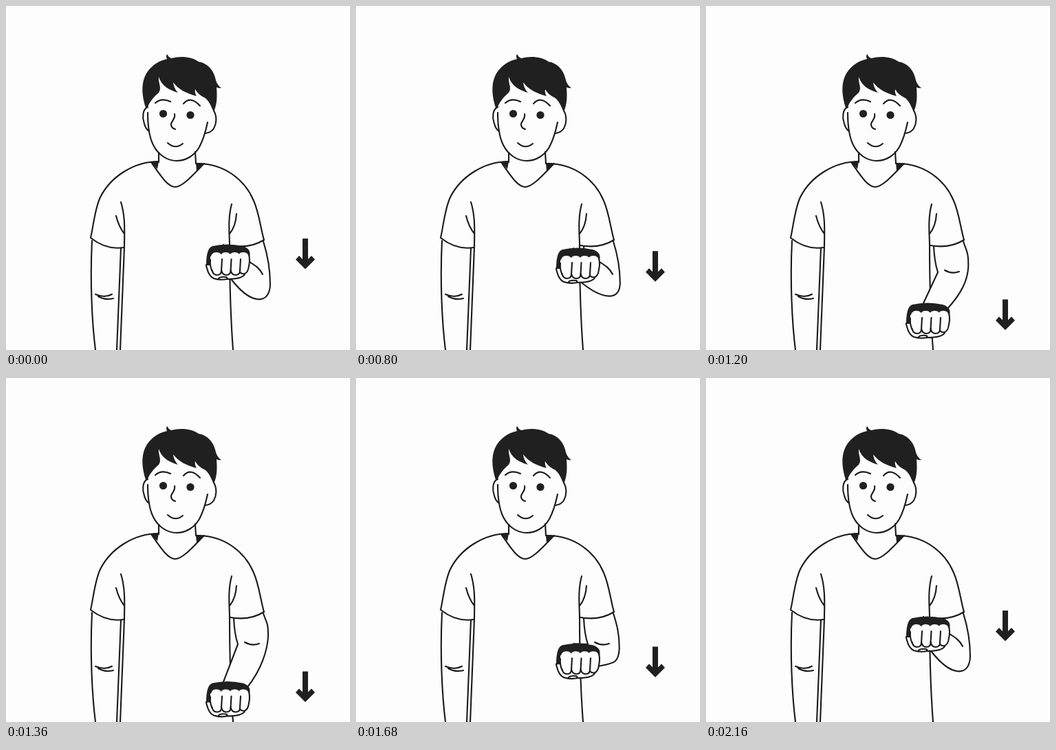
Animation, 500 px wide and 500 px high, one loop 3000 ms. Source, as an HTML page:

```html
<!DOCTYPE html>
<html lang="en">
<head>
<meta charset="utf-8">
<title>Fist moving down</title>
<style>
  html, body { margin: 0; width: 100%; height: 100%; overflow: hidden; background: #fdfdfd; }
  svg { display: block; width: 100%; height: 100%; }
  .line { fill: none; stroke: #1a1a1a; stroke-width: 2.1; stroke-linecap: round; stroke-linejoin: round; }
  .dark { fill: #202020; }
  .skin { fill: #fdfdfd; }
</style>
</head>
<body>
<svg viewBox="0 0 500 500">
  <!-- head -->
  <g class="line">
    <path d="M206 155C206 176 209 192 214 202C221 216 234 225 248 225C262 225 274 217 281 205C287 194 290 183 293 169"/>
    <path d="M206 147C198 150 198 163 201 171Q203 179 208 182"/>
    <path d="M302 152C307 161 306 171 302 178Q298 184 290 185"/>
    <path d="M217 141Q226 133 239 139M258 142Q268 130 282 145"/>
    <path d="M245 157C247 164 239 168 240 173Q241 178 246 179"/>
    <path d="M235 199Q246 209 257 200"/>
    <path d="M222 213V227M275 212L276 229"/>
  </g>
  <circle class="dark" cx="228.5" cy="156.5" r="5.6"/>
  <circle class="dark" cx="268" cy="158.5" r="5.6"/>
  <path class="dark" d="M203 148C198 132 196 116 202 102C208 89 220 80 234 77Q232 73 234 70Q236 74 240 76C254 72 271 74 280 81C293 83 301 93 304 104Q306 115 313 119Q309 120 306 118C307 132 307 142 302 154C298 147 298 142 290 134Q279 129 275 121Q274 126 277 131C263 127 251 122 243 111Q244 120 250 126C237 122 226 116 222 103C221 112 227 119 222 126C214 133 209 139 206 147Z"/>

  <!-- shirt and resting arm -->
  <path class="dark" d="M211 227L222 226L220 237ZM276 228L288 229L277 240Z"/>
  <g class="line">
    <path d="M211 227C225 247 235 263 246 263C257 263 272 245 288 229"/>
    <path d="M222 226C186 226 152 248 137 278C129 295 127 320 123 337Q146 355 171 351"/>
    <path d="M276 229C318 228 348 254 360 283C368 301 370 323 375 340"/>
    <path d="M167 285C174 307 172 330 172 350L166 500M160 305Q164 321 172 331"/>
    <path d="M125 341C122 400 125 460 130 500M167 352L161 500"/>
    <path d="M130 419Q143 425 154 419M134 422Q144 428 156 425"/>
    <path d="M328 288C322 310 325 333 325 348C325 410 327 460 330 500M335 302Q334 320 325 331"/>
  </g>

  <!-- moving arm -->
  <path id="armFill" class="skin"/>
  <path id="armLine" class="line"/>
  <path id="bentCrease" class="line" d="M346 366C354 374 366 376 373 390"/>
  <path id="longCrease" class="line" d="M347 384Q357 390 368 386"/>
  <path class="line" d="M326 348Q354 353 375 340"/>

  <g id="hand">
    <path class="skin" d="M292 376V355H353V388L347 390Q344 397 320 397C306 400 291 392 292 376Z"/>
    <path class="dark" d="M291 377C291 363 293 351 300 349Q322 344 344 349Q357 353 354 364H297V377Z"/>
    <g class="skin">
      <path id="knuckle" d="M297 386V369Q298 357 306 358Q314 358 314 367V386Z"/>
      <use href="#knuckle" x="13.5"/>
      <use href="#knuckle" x="26.5"/>
      <use href="#knuckle" x="39"/>
    </g>
    <g class="line">
      <path id="finger" d="M299.5 384Q301 391 306.5 391Q313 391 313 385L314 368"/>
      <use href="#finger" x="13.5"/>
      <use href="#finger" x="27"/>
      <path d="M297 369Q296 377 299.5 385M340 387Q343 390 347 389Q352 387 353 378Q355 370 353 361"/>
      <path d="M292 376Q290 375 292 381Q295 393 302 396Q312 399 321 397Q343 397 347 390M309 396Q311 393 320 394Q323 395 320 397"/>
    </g>
  </g>

  <path id="arrow" class="dark" d="M431 338H439V368L444 363L449 368.5L435 382.5L421 368.5L426 363L431 368Z"/>
</svg>
<script>
const $ = id => document.getElementById(id);
const clamp = x => Math.min(1, Math.max(0, x));
const ease = (t, from, to) => {
  const s = clamp((t - from) / (to - from));
  return s * s * (3 - 2 * s);
};

// Forearm contour from sleeve round the elbow to the wrist.
function forearm(drop) {
  const reach = drop / 96, bend = Math.sqrt(reach);
  const elbowX = 384 - 3 * reach, elbowY = 405 - 30 * reach;
  const wristX = 328 + 22 * ease(drop, 2, 26);
  const wristY = 398 + drop - 42 * ease(drop, 10, 75);
  return `M374 342C379 358 ${elbowX} ${elbowY - 22} ${elbowX} ${elbowY}` +
    `C${elbowX - 1} ${elbowY + 30 - 11 * bend} ${wristX + 28 - 6 * bend} ${wristY + 36 - 64 * bend} ${wristX} ${wristY}`;
}

function draw(now) {
  const t = Math.floor(now % 3000 / 40) * 40;
  const drop = 95.5 * (ease(t, 715, 1326) - ease(t, 1322, 1962));
  const slide = 88.5 * (ease(t, 632, 1208) - ease(t, 1400, 2040));
  const outer = forearm(drop);
  const top = 347 + drop;

  $("armFill").setAttribute("d", `${outer}L316 ${top}L337 387Q333 372 331 349Z`);
  $("armLine").setAttribute("d", `${outer}M331 349Q332 372 337 387L316 ${top}`);
  $("bentCrease").style.opacity = clamp((22 - drop) / 14);
  $("longCrease").style.opacity = clamp((drop - 24) / 15);
  $("hand").setAttribute("transform", `translate(0 ${drop})`);
  $("arrow").setAttribute("transform", `translate(0 ${slide})`);
}

const start = performance.now();
function tick() {
  draw(performance.now() - start);
  requestAnimationFrame(tick);
}
tick();
</script>
</body>
</html>
```
